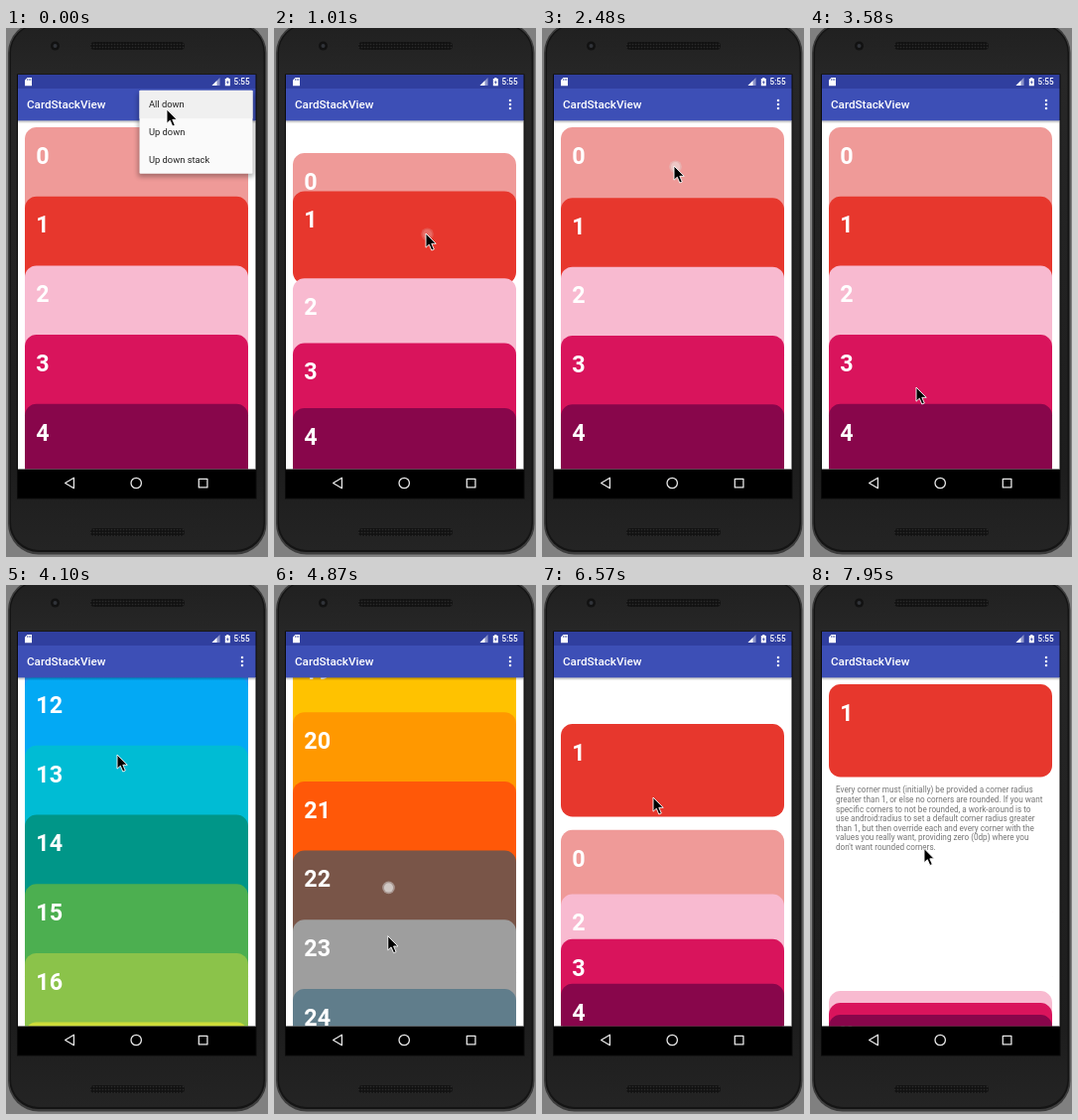
Write an HTML page that moves like this. It is 264 px wide and 533 px high and loops after 8 s.

```html
<!DOCTYPE html>
<html lang="en">
<head>
<meta charset="utf-8">
<title>Card stack</title>
<style>
  html, body { margin: 0; width: 100%; height: 100%; overflow: hidden; background: #808080; }
  svg { display: block; width: 100vw; height: 100vh; font-family: Roboto, sans-serif; }
  .num { font-size: 23.3px; font-weight: 700; fill: #fff; }
  .note { font-size: 8.17px; fill: #757575; }
  .item { font-size: 9.33px; fill: #212121; }
</style>
</head>
<body>
<svg viewBox="0 0 264 533">
  <defs>
    <linearGradient id="body" x1="0" y1="0" x2="0" y2="1">
      <stop offset="0" stop-color="#202020"/>
      <stop offset=".1" stop-color="#272727"/>
      <stop offset=".85" stop-color="#1d1d1d"/>
      <stop offset="1" stop-color="#242424"/>
    </linearGradient>
    <linearGradient id="shade" x1="0" y1="0" x2="0" y2="1">
      <stop offset="0" stop-color="#000" stop-opacity=".28"/>
      <stop offset="1" stop-color="#000" stop-opacity="0"/>
    </linearGradient>
    <pattern id="mesh" width="3" height="3" patternUnits="userSpaceOnUse">
      <rect width="3" height="3" fill="#121212"/>
      <circle cx="1.5" cy="1.5" r=".8" fill="#2b2b2b"/>
    </pattern>
    <filter id="blur" x="-20%" y="-20%" width="140%" height="140%">
      <feGaussianBlur stdDeviation="2.5"/>
    </filter>
    <clipPath id="view"><rect x="12" y="93" width="239.5" height="351.5"/></clipPath>
  </defs>

  <!-- phone -->
  <rect width="264" height="533" fill="#808080"/>
  <rect x="2" y="-6" width="260.5" height="536.5" rx="31" fill="#3c3c3c"/>
  <rect x="3.5" y="-4" width="257.5" height="532" rx="29" fill="#141414"/>
  <rect x="5" y="-3" width="254.5" height="529" rx="28" fill="url(#body)"/>
  <rect x="85" y="14" width="95" height="8" rx="4" fill="url(#mesh)"/>
  <rect x="85" y="504" width="95" height="8" rx="4" fill="url(#mesh)"/>
  <circle cx="49.5" cy="18" r="4.5" fill="#121212"/>
  <circle cx="49.5" cy="18" r="2" fill="#31343a"/>
  <rect x="11" y="46.5" width="241.5" height="428" fill="#0b0b0b"/>

  <!-- content -->
  <rect x="12" y="93" width="239.5" height="352" fill="#fff"/>
  <g id="cards" clip-path="url(#view)"></g>
  <rect x="12" y="93" width="239.5" height="3.5" fill="url(#shade)"/>

  <!-- status and app bars -->
  <rect x="12" y="47" width="239.5" height="14" fill="#303f9f"/>
  <rect x="12" y="61" width="239.5" height="32.3" fill="#3d4fb6"/>
  <path d="M21.5 50H26V58.2H19V52.5Z" fill="#fff"/>
  <path d="M21.6 51v2M23.2 51v2M24.7 51v2" stroke="#303f9f" stroke-width=".6"/>
  <path d="M207.5 58L215.5 50V58Z" fill="#fff" opacity=".45"/>
  <path d="M207.5 58L212.5 53V58Z" fill="#fff"/>
  <path d="M220.8 51H222.2V50H224.4V51H225.8V58.2H220.8Z" fill="#fff"/>
  <path d="M223.8 52.2L222 55H223.2L222.8 57.2L224.7 54.2H223.4Z" fill="#303f9f"/>
  <text x="229.5" y="57.2" font-size="8.17" font-weight="500" fill="#fff">5:55</text>
  <text x="21" y="81.2" font-size="11.67" font-weight="500" fill="#fff">CardStackView</text>
  <g fill="#fff">
    <circle cx="238" cy="73" r="1.25"/><circle cx="238" cy="77" r="1.25"/><circle cx="238" cy="81" r="1.25"/>
  </g>

  <!-- navigation bar -->
  <rect x="12" y="444.5" width="239.5" height="29" fill="#000"/>
  <g fill="none" stroke="#e8e8e8" stroke-width="1.3" stroke-linejoin="round">
    <path d="M59.6 458.5L68.4 453.3V463.7Z"/>
    <circle cx="131.2" cy="458.5" r="5.2"/>
    <rect x="194.3" y="454.3" width="8.6" height="8.6"/>
  </g>

  <!-- overflow menu -->
  <g id="menu">
    <rect x="133" y="66" width="117" height="84" rx="2" opacity=".3" filter="url(#blur)"/>
    <rect x="134.5" y="62.8" width="114" height="84" rx="1" fill="#fafafa"/>
    <rect x="134.5" y="63" width="114" height="28.3" fill="#f0f0f0"/>
    <text class="item" x="144" y="80.3">All down</text>
    <text class="item" x="144" y="108.3">Up down</text>
    <text class="item" x="144" y="136.3">Up down stack</text>
  </g>

  <g id="dot">
    <circle r="6.3" fill="#dcdcdc" opacity=".5"/>
    <circle r="4.6" fill="#f2f2f2" opacity=".55"/>
  </g>
  <path id="arrow" d="M0 0V14.2L3.3 11.2L5.8 17L8.3 16L5.8 10.3H10.2Z" fill="#000" stroke="#fff" stroke-width=".9"/>
</svg>
<script>
const LOOP = 8000, TOP = 100, STEP = 69.7, FLOOR = 444.7, MAX_SCROLL = 1499, MOVE = 400, LAG = 33;

const COLORS = `ef9a98 e7372d f8bad0 d9145c 88064b ce92d9 8d19aa 4a148c b388ff 673ab7
  3f51b5 2196f3 03a9f4 00bcd4 009688 4caf50 8bc34a cddc39 ffeb3b ffc200
  ff9800 ff5808 795548 9e9e9e 607d8b 263238`.split(/\s+/);

const NOTE = [
  'Every corner must (initially) be provided a corner radius',
  'greater than 1, or else no corners are rounded. If you want',
  'specific corners to not be rounded, a work-around is to',
  'use android:radius to set a default corner radius greater',
  'than 1, but then override each and every corner with the',
  'values you really want, providing zero (0dp) where you',
  "don't want rounded corners."
];

// pointer stops: time, x, y
const PATH = [
  [0, 162, 82], [220, 162, 82], [590, 153, 207], [1340, 153, 207], [1540, 152, 156],
  [2110, 152, 156], [2240, 133, 139], [3200, 133, 139], [3540, 107, 362], [3610, 107, 362],
  [3830, 112, 171], [4740, 112, 171], [4900, 115, 371], [5080, 115, 371], [5500, 126, 176],
  [5590, 126, 176], [5800, 118, 330], [5950, 118, 330], [6170, 112, 214], [6820, 112, 214],
  [7200, 107, 212], [7250, 107, 212], [7260, 109, 212], [7440, 109, 212], [7610, 97, 375],
  [7840, 97, 375], [7950, 115, 265.5]
];

const TOUCHES = [[940, 1030], [1690, 1790], [2460, 2516], [3050, 3140],
  [3630, 3840], [4740, 4920], [5610, 5820], [6395, 6490]];

const OPENINGS = [
  { card: 1, open: 940, close: 1705 },
  { card: 0, open: 2460, close: 3050 },
  { card: 1, open: 6390, close: Infinity }
];

const $ = id => document.getElementById(id);
const clamp = u => Math.max(0, Math.min(1, u));
const smooth = u => u * u * (3 - 2 * u);
const swing = u => (1 - Math.cos(Math.PI * clamp(u))) / 2;
const mix = (a, b, u) => a + (b - a) * u;
const place = (el, x, y) => el.setAttribute('transform', `translate(${x.toFixed(2)} ${y.toFixed(2)})`);

function add(tag, parent, attrs, text) {
  const el = document.createElementNS('http://www.w3.org/2000/svg', tag);
  for (const k in attrs) el.setAttribute(k, attrs[k]);
  if (text !== undefined) el.textContent = text;
  return parent.appendChild(el);
}

const cards = COLORS.map((color, i) => {
  const el = add('g', $('cards'), {});
  add('rect', el, { x: 19, width: 225, height: 93.4, rx: 11.7, fill: '#' + color });
  add('text', el, { class: 'num', x: 30.3, y: 36.8 }, i);
  const note = add('g', el, {});
  if (i < 2) NOTE.forEach((line, k) => add('text', note, { class: 'note', x: 26, y: 109.3 + 9.6 * k }, line));
  return { el, note };
});

function pointer(t) {
  const n = PATH.findIndex(p => p[0] > t);
  if (n < 0) return PATH[PATH.length - 1].slice(1);
  if (n === 0) return PATH[0].slice(1);
  const [a, b] = [PATH[n - 1], PATH[n]];
  const u = smooth((t - a[0]) / (b[0] - a[0]));
  return [mix(a[1], b[1], u), mix(a[2], b[2], u)];
}

const fingerY = t => pointer(t - LAG)[1];
const fling = (t, t0, t1, from, to) => mix(from, to, 1 - (1 - clamp((t - t0) / (t1 - t0))) ** 1.6);

function scrollAt(t) {
  const pull = s => MAX_SCROLL - (fingerY(s) - 171);
  if (t < 3610) return 0;
  if (t < 3800) return 362 - fingerY(t);
  if (t < 4740) return fling(t, 3800, 4630, 362 - fingerY(3800), MAX_SCROLL);
  if (t < 4885) return pull(t);
  if (t < 5590) return fling(t, 4885, 5520, pull(4885), 132);
  if (t < 5830) return Math.max(0, 132 - (fingerY(t) - 176));
  return 0;
}

function openY(i, card) {
  if (i === card) return TOP;
  const rank = i - card - 1;
  return rank >= 0 && rank < 3 ? 409 + 12 * rank : FLOOR;
}

function draw(t) {
  const scroll = scrollAt(t);
  const cur = OPENINGS.filter(o => t >= o.open).pop();
  const p = cur ? swing((t - cur.open) / MOVE) * (1 - swing((t - cur.close) / MOVE)) : 0;
  const reading = cur && t >= cur.open + MOVE && t < cur.close;

  cards.forEach(({ el, note }, i) => {
    const rest = TOP + STEP * i - scroll;
    place(el, 0, cur ? mix(rest, openY(i, cur.card), p) : rest);
    note.setAttribute('visibility', reading && cur.card === i ? 'visible' : 'hidden');
  });

  $('menu').setAttribute('opacity', clamp(1 - (t - 60) / 200));

  const touch = TOUCHES.find(([a, b]) => t >= a && t < b);
  $('dot').setAttribute('opacity', touch ? clamp((touch[1] - t) / 50) : 0);
  const [fx, fy] = pointer(t - LAG);
  place($('dot'), fx + 1.5, fy + 0.7);
  place($('arrow'), ...pointer(t));
}

const start = performance.now();
function tick() {
  draw((performance.now() - start) % LOOP);
  requestAnimationFrame(tick);
}
draw(0);
requestAnimationFrame(tick);
</script>
</body>
</html>
```
